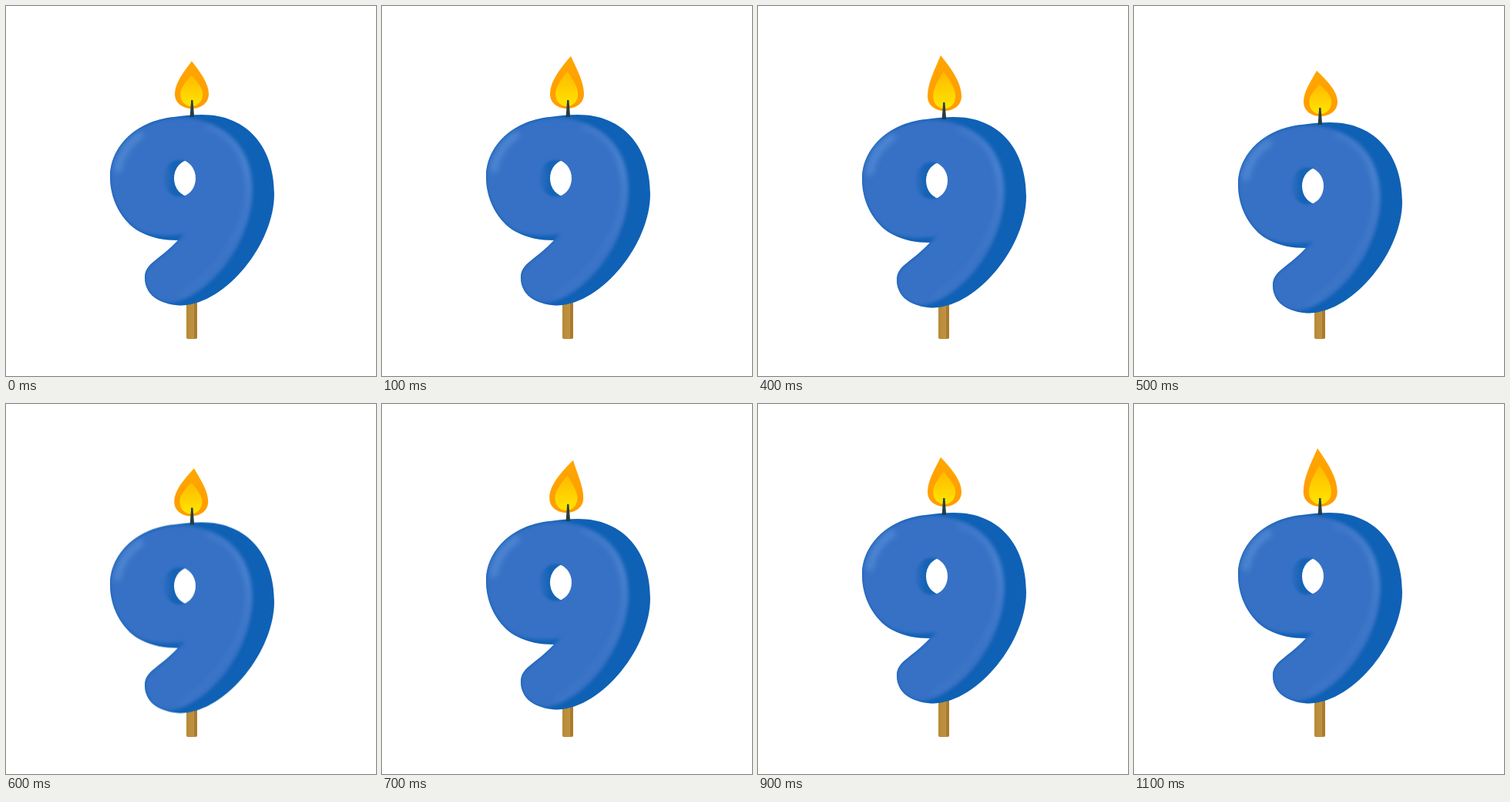
An HTML page with a canvas for the animation above (1200 ms loop, 480 px wide and 480 px high).

```html
<!DOCTYPE html>
<html lang="en">
<head>
<meta charset="utf-8">
<title>Birthday candle</title>
<style>
html, body { margin: 0; width: 100%; height: 100%; overflow: hidden; background: #fff; }
canvas { display: block; width: 480px; height: 480px; }
</style>
</head>
<body>
<canvas id="stage" width="480" height="480"></canvas>
<script>
const ctx = document.getElementById('stage').getContext('2d');
const STEP = 100;

// One pose per step: body drop, flame lean, flame tip height
const poses = [
  [0, 0, 71.5], [0, 4, 65], [0, 6, 58.5], [0, 4.5, 72],
  [3, -4, 61], [10, -4, 74], [12.5, 3, 71], [8, 7, 65],
  [1, -2, 74], [0, -4, 69], [0, -4, 62], [0, -3, 57.5]
];

const outline = new Path2D(`M135 222 C135 180 172 147 222 143.5
  C232 142 243 141 254 141 C314 141 348 184 348 244
  C348 307 287 386 228 388.5 C218 388.5 206 386 197 381
  C186 375 180 364 180 353 C180 333 198 331 223 304
  C205 304 190 301 176 294 C156 285 135 257 135 222Z`);
const face = new Path2D(`M135 222 C135 180 172 148 222 145
  C282 144 319.5 182 319.5 240 C319.5 310 262 378 215 385
  C195 386 180 370 180 353 C180 333 200 331 222 305 L232 296
  C215 299 195 299 176 293 C156 284 135 257 135 222Z`);
const rightGlow = new Path2D('M262 158 C296 168 314 196 315 238 C313 296 265 354 228 375');
const leftGlow = new Path2D('M145 212 C149 193 158 178 174 168');

function ellipse(x, y, rx, ry) {
  const p = new Path2D();
  p.ellipse(x, y, rx, ry, 0, 0, Math.PI * 2);
  return p;
}

function gradient(c, x0, y0, x1, y1, ...colors) {
  const g = c.createLinearGradient(x0, y0, x1, y1);
  colors.forEach((color, i) => g.addColorStop(i / (colors.length - 1), color));
  return g;
}

function glow(c, path, width, style) {
  c.filter = 'blur(3.5px)';
  c.lineCap = 'round';
  c.lineWidth = width;
  c.strokeStyle = style;
  c.stroke(path);
  c.filter = 'none';
}

function makeBody() {
  const canvas = document.createElement('canvas');
  canvas.width = canvas.height = 480;
  const c = canvas.getContext('2d');
  const hole = ellipse(225, 223.5, 21, 24);
  const backHole = ellipse(239, 223.5, 21, 24);
  const shine = a => `rgba(100,154,224,${a})`;

  c.save();
  c.clip(outline);
  c.fillStyle = '#0f61b5';
  c.fillRect(0, 0, 480, 480);
  c.filter = 'blur(2px)';
  c.fillStyle = '#3771c5';
  c.fill(face);
  c.filter = 'none';
  glow(c, rightGlow, 7, gradient(c, 0, 150, 0, 380, shine(.2), shine(.5), shine(.25), shine(.15), shine(.15)));
  glow(c, leftGlow, 10, shine(.5));

  // Inner wall of the hole, fading out to the left
  c.save();
  c.beginPath();
  c.rect(190, 190, 42, 70);
  c.clip();
  c.filter = 'blur(1.8px)';
  c.fillStyle = gradient(c, 202, 0, 217, 0, '#3771c5', '#1563b6');
  c.fill(hole);
  c.restore();
  c.restore();

  c.clip(hole);
  c.globalCompositeOperation = 'destination-out';
  c.fill(backHole);
  return canvas;
}

const body = makeBody();

// The tip leans while the belly stays put, so the far side bulges
function drop(cx, tipX, tipY, half, wideY, baseY, fill) {
  const rise = wideY - tipY;
  const bend = cx + (tipX - cx) * .3;
  const low = wideY + (baseY - wideY) * .62;
  ctx.beginPath();
  ctx.moveTo(tipX, tipY);
  ctx.bezierCurveTo(bend + half * .5, tipY + rise * .34, cx + half, wideY - rise * .32, cx + half, wideY);
  ctx.bezierCurveTo(cx + half, low, cx + half * .55, baseY, cx, baseY);
  ctx.bezierCurveTo(cx - half * .55, baseY, cx - half, low, cx - half, wideY);
  ctx.bezierCurveTo(cx - half, wideY - rise * .32, bend - half * .5, tipY + rise * .34, tipX, tipY);
  ctx.fillStyle = fill;
  ctx.fill();
}

function drawFlame(lean, tip) {
  const cx = 241 - lean * .25;
  const innerTip = 90 + (tip - 72) * .7;
  drop(cx, 241 + lean, tip, 22, 114, 133, gradient(ctx, 0, tip, 0, 133, '#ffa600', '#ff9c00'));
  drop(cx - .3, 240.6, innerTip, 14.5, 114, 130, gradient(ctx, 0, innerTip, 0, 130, '#ffb900', '#ffe500'));
}

function drawWick() {
  ctx.beginPath();
  ctx.moveTo(240.2, 122);
  ctx.lineTo(242.4, 122);
  ctx.lineTo(244.2, 144);
  ctx.lineTo(238.6, 144);
  ctx.closePath();
  ctx.fillStyle = '#263d45';
  ctx.fill();
}

function drawStick() {
  ctx.fillStyle = gradient(ctx, 234, 0, 245, 0, '#b78a38', '#bf9442');
  ctx.beginPath();
  ctx.roundRect(234, 375, 14, 57, 2);
  ctx.fill();
  ctx.fillStyle = '#aa7b2f';
  ctx.fillRect(244, 375, 4, 56);
}

function draw(now) {
  const [fall, lean, tip] = poses[Math.floor(now / STEP) % poses.length];
  ctx.fillStyle = '#fff';
  ctx.fillRect(0, 0, 480, 480);
  drawStick();
  ctx.save();
  ctx.translate(0, fall);
  ctx.drawImage(body, 0, 0);
  drawFlame(lean, tip);
  drawWick();
  ctx.restore();
}

let start;
function tick(now) {
  start ??= now;
  draw(now - start);
  requestAnimationFrame(tick);
}
draw(0);
requestAnimationFrame(tick);
</script>
</body>
</html>
```
